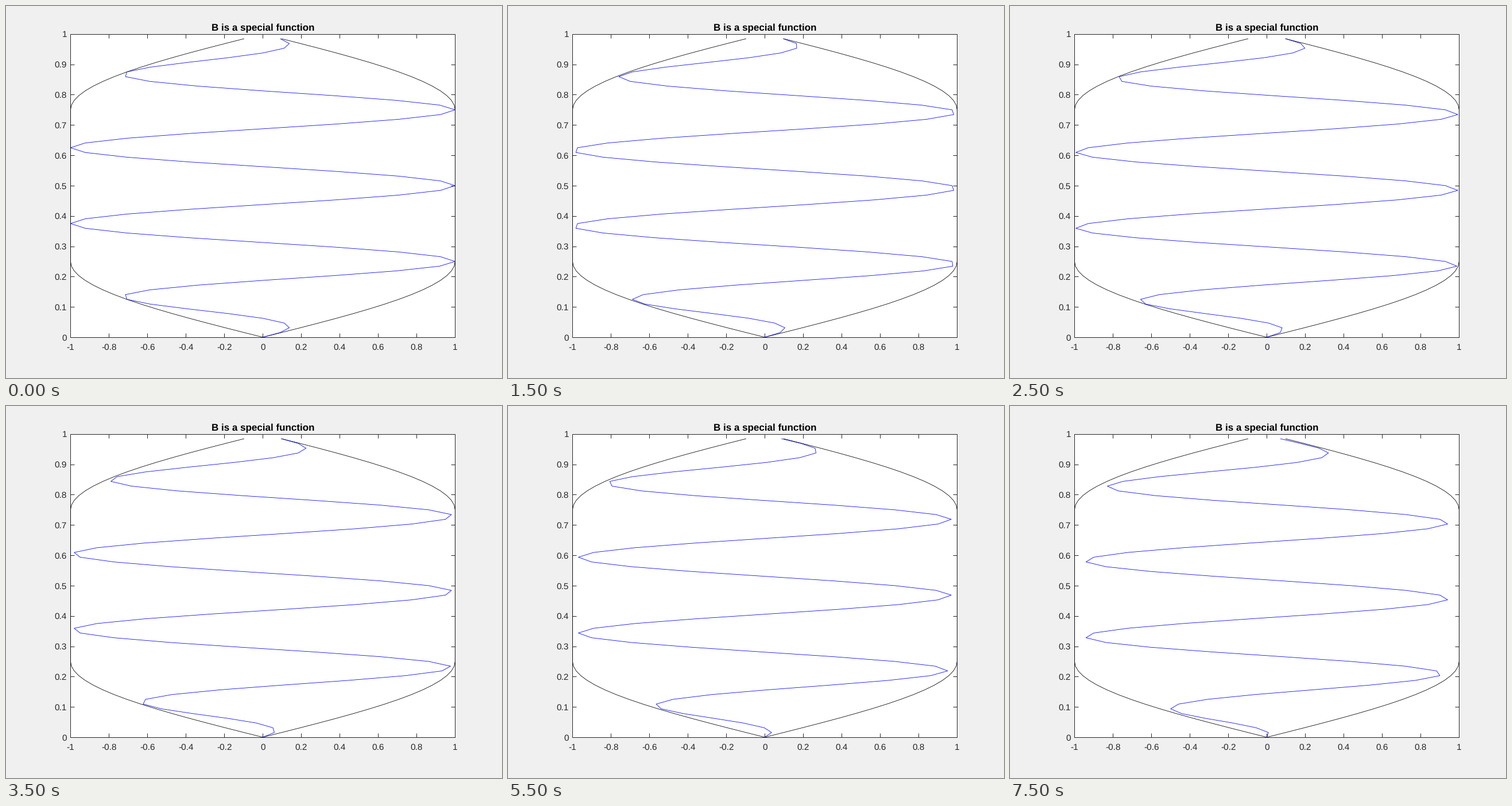
Write a matplotlib script that moves like this. It is 864 by 648 pixels and loops after 8000 ms.

```python
import numpy as np
import matplotlib.pyplot as plt
from matplotlib.animation import FuncAnimation

W, H, DPI = 864, 648, 72
LEFT, RIGHT, BOTTOM, TOP = 112.4, 782.3, 71.0, 599.2
FRAMES, STEP_MS = 16, 500
GRAY = "0.15"

plt.rcParams.update({
    "font.family": "Liberation Sans",
    "text.hinting": "none",
    "axes.unicode_minus": False,
    "path.simplify": False,
})

fig = plt.figure(figsize=(W / DPI, H / DPI), dpi=DPI, facecolor="0.94")
ax = fig.add_axes([LEFT / W, BOTTOM / H, (RIGHT - LEFT) / W, (TOP - BOTTOM) / H])
ax.set(xlim=(-1, 1), ylim=(0, 1))

xticks = np.linspace(-1, 1, 11)
yticks = np.linspace(0, 1, 11)
ax.set_xticks(xticks)
ax.set_yticks(yticks)
ax.tick_params(direction="in", length=6.7, width=1, color=GRAY,
               top=True, right=True, labelbottom=False, labelleft=False)
for spine in ax.spines.values():
    spine.set(linewidth=1, edgecolor=GRAY)


def label(x, y, text, size=15.43, **style):
    """Place text by its baseline, in pixels from the lower left corner."""
    fig.text(x / W, y / H, text, fontsize=size, va="baseline", **style)


def number(v):
    return f"{round(v, 1) + 0:g}"


for v in xticks:
    label(LEFT + (v + 1) / 2 * (RIGHT - LEFT), H - 599, number(v),
          ha="center", color=GRAY)
for v in yticks:
    label(106, BOTTOM + v * (TOP - BOTTOM) - 5.5, number(v),
          ha="right", color=GRAY)
label((LEFT + RIGHT) / 2, H - 42, "B is a special function", 16.97,
      ha="center", weight="bold", color="black")

# Sine-tapered envelope, flat over the middle half
y = np.arange(64) / 64
envelope = np.where(np.abs(y - 0.5) <= 0.25, 1, np.abs(np.sin(2 * np.pi * y)))
for sign in (-1, 1):
    ax.plot(sign * envelope, y, color="black", lw=0.8, zorder=3)
wave, = ax.plot([], [], color="blue", lw=0.8, zorder=4)


def update(k):
    phase = np.radians(4.165 * k)
    fade = np.cos(0.0224 * k)
    wave.set_data(fade * envelope * np.cos(8 * np.pi * y + phase), y)
    return wave,


anim = FuncAnimation(fig, update, frames=FRAMES, interval=STEP_MS,
                     repeat=True, repeat_delay=0)
plt.show()
```
